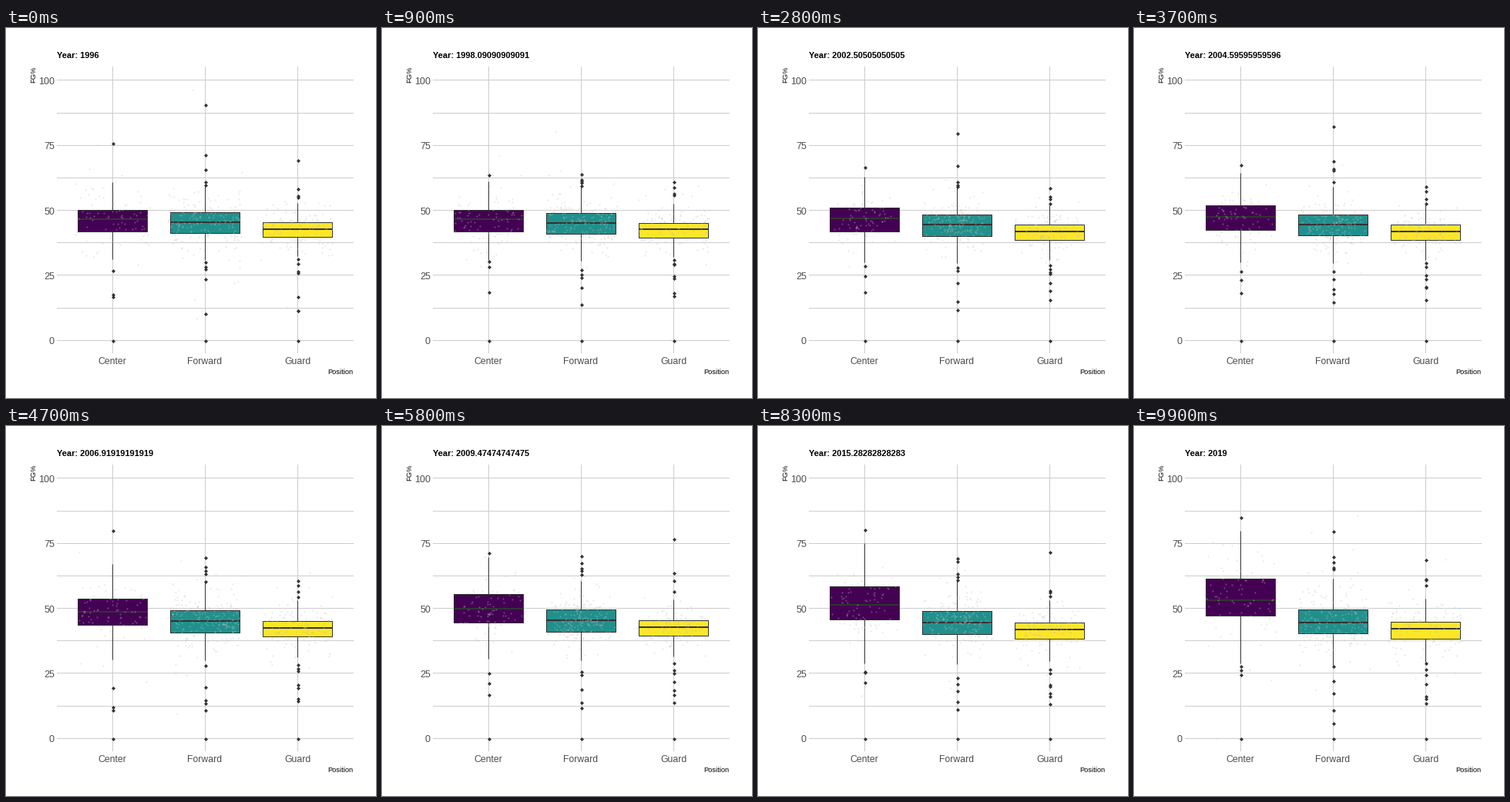
Write a matplotlib script that moves like this. It is 480 px wide and 480 px high and loops after 10000 ms.

```python
import numpy as np
import matplotlib.pyplot as plt
from matplotlib.animation import FuncAnimation
from matplotlib.patches import Rectangle

FRAMES = 100
START, SPAN = 1996, 23
PX = 0.75  # points per pixel at 96 dpi
DARK, GRID, LABEL = "#333333", "#cccccc", "#4d4d4d"

rng = np.random.default_rng(7)


def ypx(v):
    return 404.84 - 3.375 * np.asarray(v)


def tween(yearly, t):
    """Linear drift from each year's row to the next."""
    i = min(int(t), SPAN - 1)
    return yearly[i] + (yearly[i + 1] - yearly[i]) * (t - i)


fig = plt.figure(figsize=(5, 5), dpi=96, facecolor="white")
ax = fig.add_axes([0, 0, 1, 1])
ax.set(xlim=(0, 480), ylim=(480, 0))
ax.axis("off")


def text(x, y, s, size, color="black", **kw):
    return ax.text(x, y, s, fontsize=size * PX, color=color,
                   family="Liberation Sans", va="baseline", **kw)


def line(z, width=1, color=DARK, cap="butt"):
    return ax.plot([], [], color=color, lw=width * PX, zorder=z,
                   solid_capstyle=cap)[0]


def grid_line(xs, ys):
    line(1, color=GRID, cap="projecting").set_data(xs, ys)


class Group:
    def __init__(self, name, x, fill, quartiles, rise, count, below, above):
        self.x = x
        self.quartiles, self.rise = np.array(quartiles), np.array(rise)
        text(x, 436, name, 12.3, LABEL, ha="center")
        grid_line([x, x], [50, 421])

        self.outliers = ax.scatter([], [], marker="D", s=(3.54 * PX) ** 2,
                                   color=DARK, linewidths=0, zorder=2,
                                   antialiased=False)
        self.whiskers = line(3)
        self.box = ax.add_patch(Rectangle((x - 45, 0), 90, 1, fc=fill,
                                          ec=DARK, lw=PX, zorder=4))
        self.median = line(5, 2)
        self.dots = ax.plot([], [], "o", color="#bebebe", alpha=0.4,
                            ms=2 * PX, mew=0, zorder=6)[0]

        # Fresh sample for every year
        years = SPAN + 1
        self.dx = rng.uniform(-48, 48, (years, count))
        self.z = rng.standard_t(5, (years, count))
        self.low = np.sort(rng.random((years, below)) ** 0.6)
        self.low[:, 0] = 0
        self.high = np.sort(rng.exponential(6, (years, above)))

    def draw(self, t):
        x, u = self.x, t / SPAN
        wobble = 0.5 * np.cos(2 * np.pi * u / 0.59)
        q1, med, q3 = self.quartiles + self.rise * u ** 1.5 + wobble
        reach = 1.3 * (q3 - q1)
        lo, hi = q1 - reach, q3 + reach

        out = np.concatenate([lo * tween(self.low, t),
                              np.minimum(hi + tween(self.high, t), 100)])
        self.outliers.set_offsets(np.column_stack(
            [np.full(len(out), x + 0.5), np.round(ypx(out)) + 0.5]))
        self.whiskers.set_data([x, x, np.nan, x, x],
                               ypx([lo, q1, np.nan, q3, hi]))
        self.box.set_y(ypx(q3))
        self.box.set_height(ypx(q1) - ypx(q3))
        self.median.set_data([x - 45, x + 45], ypx([med, med]))

        spread = (q3 - q1) / 1.4
        values = np.clip(med + tween(self.z, t) * spread, 0, 100)
        self.dots.set_data(x + tween(self.dx, t), ypx(values))


for v in np.arange(0, 101, 12.5):
    grid_line([66, 450], ypx([v, v]))
    if v % 25 == 0:
        text(63, ypx(v) + 5.5, f"{v:.0f}", 12.5, LABEL, ha="right")

groups = [
    Group("Center", 138, "#440154", (41.3, 46.1, 49.5), (6, 7.2, 12),
          count=85, below=4, above=1),
    Group("Forward", 258, "#21908c", (40.6, 44.8, 48.5), (-0.3, -0.1, 1),
          count=190, below=6, above=5),
    Group("Guard", 378, "#fde725", (39.1, 42.2, 44.8), (-0.8, -0.1, 0.2),
          count=135, below=8, above=4),
]

text(450, 449, "Position", 9.3, ha="right")
text(38.5, 71, "FG%", 9.4, rotation=90, rotation_mode="anchor", ha="left")
title = text(66, 39, "", 11, weight="bold")


def update(step):
    t = SPAN * step / (FRAMES - 1)
    title.set_text(f"Year: {START + t:.15g}")
    for g in groups:
        g.draw(t)


anim = FuncAnimation(fig, update, frames=FRAMES, interval=100,
                     init_func=lambda: update(0), repeat=True)
plt.show()
```
